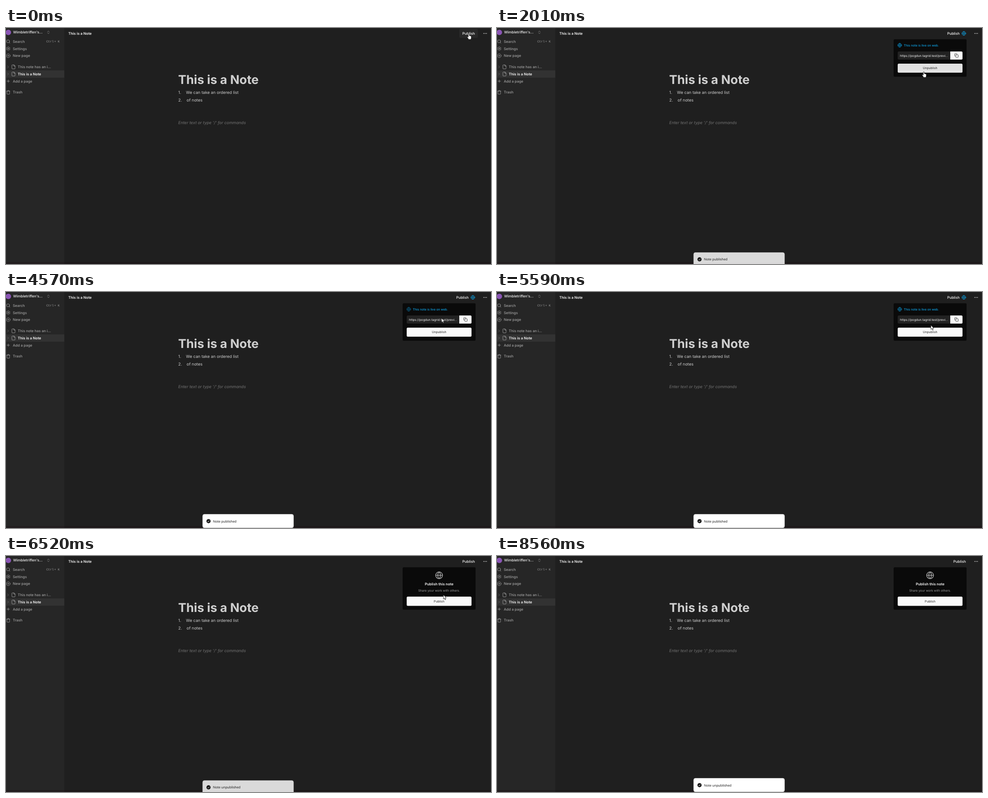
Animation, 1070 px wide and 523 px high, one loop 9520 ms. Source, as an HTML page:

```html
<!DOCTYPE html>
<html lang="en">
<head>
<meta charset="utf-8">
<title>Publish a note</title>
<style>
html, body { margin: 0; width: 100%; height: 100%; overflow: hidden; background: #1f1f1f; }
svg { display: block; width: 1070px; height: 523px; }
text { font-family: Inter, sans-serif; white-space: pre; text-rendering: geometricPrecision; }
</style>
</head>
<body>
<svg id="stage" viewBox="0 0 1070 523" xmlns="http://www.w3.org/2000/svg"></svg>
<script>
const LOOP = 9520;
const SMALL = 6.77, BASE = 7.9, BODY = 9.02;
const MUTED = '#a1a1a1', SKY = '#0ea5e9';

const OPEN = 40, PUBLISHED = 1900, UNPUBLISHED = 6480, CURSOR_GONE = 8560;
const TOASTS = [
  { start: 1830, done: 1950, leave: 5680, busy: 'Publishing...', text: 'Note published' },
  { start: 6340, done: 6500, leave: Infinity, busy: 'Unpublishing...', text: 'Note unpublished' }
];

// time, x, y of the pointer tip
const POINTER = [
  [0, 1021, 12], [730, 1021, 12], [1240, 960, 95], [1300, 960, 95], [1570, 939, 99],
  [1900, 939, 99], [2770, 997, 37], [2980, 997, 37], [3340, 965, 88], [3670, 1014, 59],
  [4210, 1014, 59], [4540, 961, 58], [4600, 961, 58], [4860, 985, 90], [5110, 950, 62],
  [5300, 950, 62], [5900, 965, 86], [8100, 965, 86], [8190, 950, 110], [8540, 1054, 474]
];

const BUTTONS = {
  header: [1000, 2, 41, 20],
  publish: [884, 90, 143, 20.5],
  copy: [1000, 52, 27, 18],
  unpublish: [884, 79, 143, 20]
};

const rect = ([x, y, w, h], fill, r = 0, extra = '') =>
  `<rect x="${x}" y="${y}" width="${w}" height="${h}" rx="${r}" fill="${fill}" ${extra}/>`;

const label = (str, x, y, size, fill, weight = 400, extra = '') =>
  `<text x="${x}" y="${y}" font-size="${size}" fill="${fill}" font-weight="${weight}" ${extra}>${str}</text>`;

const centred = (str, y, size, fill, weight, extra = '') =>
  label(str, 955.5, y, size, fill, weight, 'text-anchor="middle" ' + extra);

const group = (id, body, extra = '') => `<g id="${id}" ${extra}>${body}</g>`;

const gear = () => {
  const points = [];
  for (let i = 0; i < 60; i++) {
    const a = i * Math.PI / 30, r = 8.6 + 1.4 * Math.cos(6 * a);
    points.push((12 + r * Math.sin(a)).toFixed(1) + ' ' + (12 - r * Math.cos(a)).toFixed(1));
  }
  return `<path d="M${points.join('L')}Z"/><circle cx="12" cy="12" r="3"/>`;
};

const ICONS = {
  search: '<circle cx="11" cy="11" r="8"/><path d="M21 21l-4.3-4.3"/>',
  gear: gear(),
  plusCircle: '<circle cx="12" cy="12" r="10"/><path d="M8 12h8M12 8v8"/>',
  plus: '<path d="M5 12h14M12 5v14"/>',
  chevron: '<path d="M9 18l6-6-6-6"/>',
  upDown: '<path d="M7 15l5 5 5-5M7 9l5-5 5 5"/>',
  file: '<path d="M14.5 2H6a2 2 0 0 0-2 2v16a2 2 0 0 0 2 2h12a2 2 0 0 0 2-2V7.5ZM14 2v6h6"/>',
  trash: '<path d="M3 6h18M19 6v14a2 2 0 0 1-2 2H7a2 2 0 0 1-2-2V6M8 6V4a2 2 0 0 1 2-2h4a2 2 0 0 1 2 2v2"/>',
  globe: '<circle cx="12" cy="12" r="10"/><path d="M2 12h20M12 2a14.5 14.5 0 0 0 0 20 14.5 14.5 0 0 0 0-20"/>',
  copy: '<rect x="8" y="8" width="14" height="14" rx="2"/><path d="M4 16a2 2 0 0 1-2-2V4a2 2 0 0 1 2-2h10a2 2 0 0 1 2 2"/>'
};

const icon = (name, cx, cy, size, color = MUTED) =>
  `<g transform="translate(${cx - size / 2} ${cy - size / 2}) scale(${size / 24})" fill="none" stroke="${color}"
    stroke-width="2" stroke-linecap="round" stroke-linejoin="round">${ICONS[name]}</g>`;

const menuItem = (name, str, y) => icon(name, 5, y, 10) + label(str, 15, y + 2.8, BASE, MUTED, 500);

const pageItem = (str, y, color, weight) =>
  icon('chevron', 4.5, y, 9, '#7a7a7a') + icon('file', 16.5, y, 10.5) +
  label(str, 26, y + 2.8, BASE, color, weight);

const mono = 'style="font-family:\'Liberation Mono\',monospace"';

const sidebar = () =>
  rect([0, 0, 128.5, 523], '#262626') +
  rect([0, 94, 128.5, 16], '#323232') +
  '<circle cx="5.2" cy="9.8" r="6" fill="#8a55b5"/>' +
  label("Wimbletriffen's...", 15.7, 12.4, BASE, '#f5f5f5', 500) +
  icon('upDown', 93.5, 9.6, 9) +
  menuItem('search', 'Search', 30) +
  label('Ctrl', 89, 32.2, SMALL, MUTED, 400, mono) +
  label('+ K', 106.2, 32.2, SMALL, MUTED, 400, mono) +
  menuItem('gear', 'Settings', 45.7) +
  menuItem('plusCircle', 'New page', 61.5) +
  pageItem('This note has an i...', 86.2, MUTED, 500) +
  pageItem('This is a Note', 102, '#fafafa', 600) +
  menuItem('plus', 'Add a page', 117.8) +
  menuItem('trash', 'Trash', 142.5);

const note = () =>
  label('This is a Note', 137.5, 14.8, BASE, '#fafafa', 600) +
  label('This is a Note', 379.7, 124, 27.06, '#cfcfcf', 700) +
  label('1.', 380, 145.8, BODY, '#cfcfcf') +
  label('We can take an ordered list', 397, 145.8, BODY, '#cfcfcf') +
  label('2.', 380, 162.8, BODY, '#cfcfcf') +
  label('of notes', 398.6, 162.8, BODY, '#cfcfcf') +
  label("Enter text or type '/' for commands", 380, 213.4, BODY, '#737373', 400, 'font-style="italic"');

const header = () =>
  rect(BUTTONS.header, '#282828', 3, 'id="headerHover"') +
  label('Publish', 1006.8, 14.8, BASE, '#fafafa', 500, 'id="headerLabel"') +
  group('headerGlobe', icon('globe', 1030, 12, 10, SKY)) +
  [1053.9, 1057, 1060.1].map(x => `<circle cx="${x}" cy="12" r=".85" fill="#fafafa"/>`).join('');

const draftCard = () =>
  rect([875, 25, 161, 94], '#0a0a0a', 2.5) +
  icon('globe', 955.5, 42.8, 18) +
  centred('Publish this note', 64.7, BASE, '#fafafa', 600) +
  centred('Share your work with others.', 78.8, SMALL, MUTED, 400) +
  group('publish', rect(BUTTONS.publish, '#fafafa', 2.5) + centred('Publish', 102.6, SMALL, '#222', 400));

const liveCard = () =>
  rect([875, 25, 161, 83], '#0a0a0a', 2.5) +
  group('pulse', icon('globe', 888.5, 38.2, 10, SKY)) +
  label('This note is live on web.', 897.5, 40.6, SMALL, SKY, 500) +
  rect([884, 52, 120, 18], '#222', 2.5) +
  label('https://pogdun.tagrid.test/previ...', 889, 63.5, SMALL, '#fafafa') +
  group('copy', rect(BUTTONS.copy, '#fafafa', 2.5) + rect([1000, 52, 5, 18], '#fafafa') + icon('copy', 1013.6, 61, 9.5, '#222')) +
  group('unpublish', rect(BUTTONS.unpublish, '#fafafa', 2.5) + centred('Unpublish', 91.4, SMALL, '#222', 400));

const toast = () =>
  rect([433.8, 492.6, 200.6, 30], '#fff', 4, 'stroke="#ededed" stroke-width=".5"') +
  group('toastDone', '<circle cx="446.8" cy="507.8" r="4.6" fill="#171717"/>' +
    '<path d="M444.8 508l1.4 1.4 2.6-2.9" fill="none" stroke="#fff" stroke-width="1"/>') +
  group('toastBusy', '<circle cx="446.8" cy="507.8" r="3.4" fill="none" stroke="#777" stroke-width="1.6" stroke-dasharray=".6 1.18"/>') +
  label('', 456.7, 510.5, 7.2, '#171717', 400, 'id="toastText" style="font-family:\'Noto Sans\',sans-serif"');

const pointer = () => group('pointer',
  '<path id="arrow" d="M0 0V9.4L2.1 7.5 3.7 11 5.2 10.4 3.6 6.9H6.5Z"/>' +
  '<path id="hand" d="M-1.1 1.2Q0-.5 1.1 1.2V5Q2 4.4 2.7 5.3 3.6 4.8 4.2 5.8 5.4 5.4 5.5 6.8V9.5Q5.4 11.5 4.6 13.2H-.6Q-1 11.6-2.4 10L-3.8 7.9Q-3.2 6.6-2 7.4L-1.1 8.3Z"/>',
  'fill="#fff" stroke="#111" stroke-width=".8" stroke-linejoin="round"');

document.getElementById('stage').innerHTML =
  rect([0, 0, 1070, 523], '#1f1f1f') + sidebar() + note() + header() +
  rect([0, 519, 1070, 4], '#14000a', 0, 'opacity=".25"') +
  group('card', group('draft', draftCard()) + group('live', liveCard())) +
  group('toast', toast()) + pointer();

const $ = id => document.getElementById(id);
const show = (id, on) => { $(id).style.display = on ? '' : 'none'; };
const clamp = v => Math.max(0, Math.min(1, v));
const smooth = v => v * v * (3 - 2 * v);
const easeOut = v => 1 - (1 - v) ** 3;

function pointerAt(t) {
  const i = POINTER.findIndex(key => key[0] > t);
  if (i < 0) return POINTER[POINTER.length - 1].slice(1);
  const [t0, x0, y0] = POINTER[i - 1], [t1, x1, y1] = POINTER[i];
  const k = smooth((t - t0) / (t1 - t0));
  return [x0 + (x1 - x0) * k, y0 + (y1 - y0) * k];
}

function drawCard(t, live) {
  const k = easeOut(clamp((t - OPEN + 30) / 150));
  show('card', t >= OPEN);
  show('draft', !live);
  show('live', live);
  $('card').setAttribute('opacity', k);
  const s = 0.95 + 0.05 * k;
  $('card').setAttribute('transform', `translate(955.5 ${25 - 4.5 * (1 - k)}) scale(${s}) translate(-955.5 -25)`);
  const beat = Math.abs((((t - PUBLISHED) / 1000) % 2 + 2) % 2 - 1);
  $('pulse').setAttribute('opacity', 0.5 + 0.5 * smooth(beat));
}

function drawToast(t) {
  const item = TOASTS.find(a => t >= a.start && t < a.leave + 400);
  show('toast', !!item);
  if (!item) return;
  const k = easeOut(clamp((t - item.start) / 400)) * (1 - easeOut(clamp((t - item.leave) / 380)));
  const done = t >= item.done;
  $('toast').setAttribute('opacity', k);
  $('toast').setAttribute('transform', `translate(0 ${30 * (1 - k)})`);
  show('toastDone', done);
  show('toastBusy', !done);
  $('toastBusy').setAttribute('transform', `rotate(${t * 0.3} 446.8 507.8)`);
  $('toastText').textContent = done ? item.text : item.busy;
}

function drawPointer(t, live) {
  const [x, y] = pointerAt(t);
  const active = ['header', ...(live ? ['copy', 'unpublish'] : ['publish'])].find(id => {
    const [bx, by, w, h] = BUTTONS[id];
    return x >= bx && x <= bx + w && y >= by && y <= by + h;
  });
  show('headerHover', active === 'header');
  for (const id of ['publish', 'copy', 'unpublish']) $(id).setAttribute('opacity', id === active ? 0.9 : 1);
  show('pointer', t < CURSOR_GONE);
  show('hand', !!active);
  show('arrow', !active);
  $('pointer').setAttribute('transform', `translate(${x} ${y})`);
}

function draw(t) {
  const live = t >= PUBLISHED && t < UNPUBLISHED;
  $('headerLabel').setAttribute('x', live ? 993.2 : 1006.8);
  show('headerGlobe', live);
  drawCard(t, live);
  drawToast(t);
  drawPointer(t, live);
}

const begin = performance.now();
function tick() {
  draw((performance.now() - begin) % LOOP);
  requestAnimationFrame(tick);
}
tick();
</script>
</body>
</html>
```
